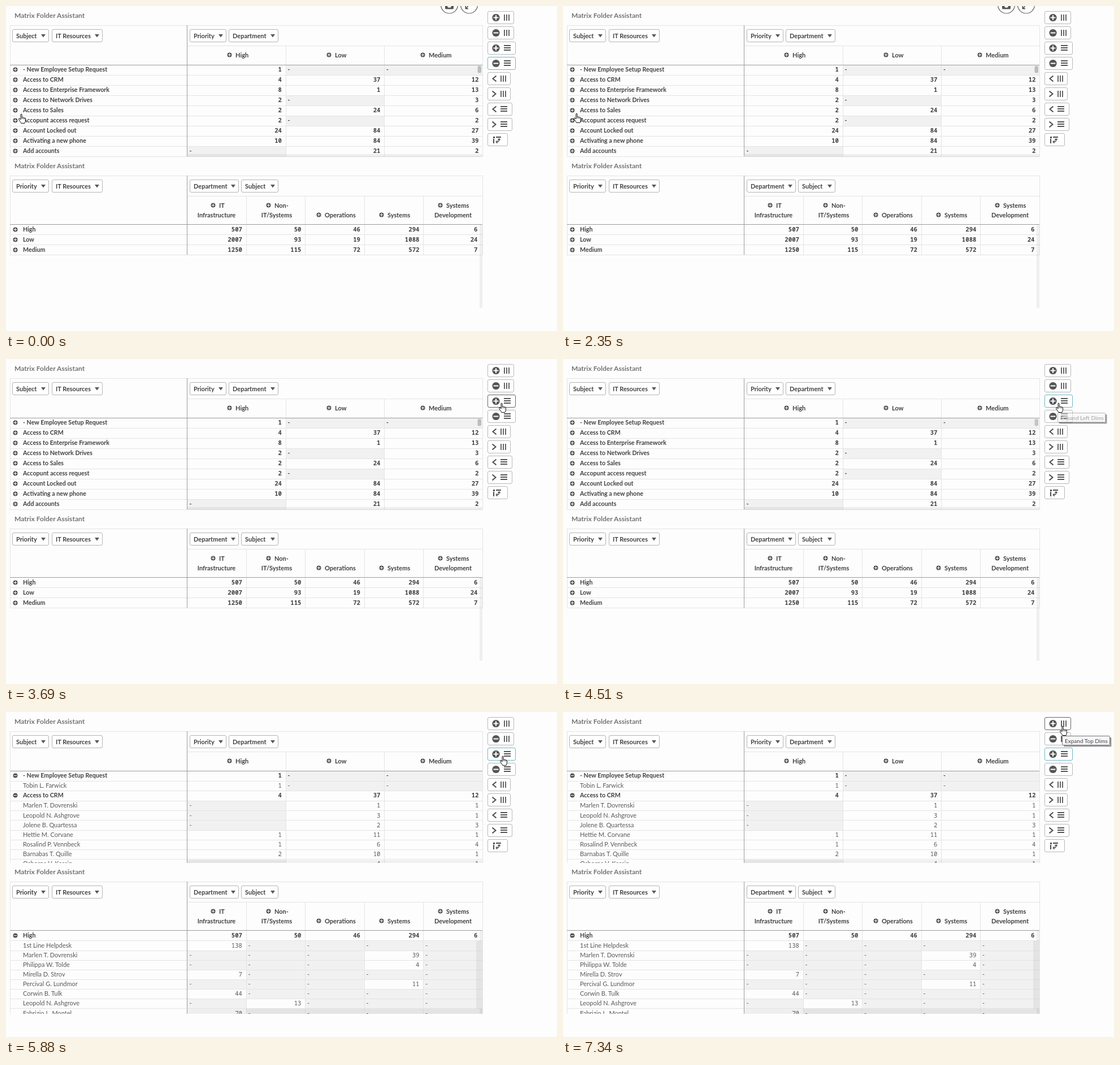
These frames come from a looping animation (975x575 px, 8000 ms). An HTML page:

```html
<!DOCTYPE html>
<html lang="en">
<head>
<meta charset="utf-8">
<title>Pivot tables</title>
<style>
html, body { margin: 0; width: 100%; height: 100%; overflow: hidden; background: #fdfdfd; }
svg { display: block; }
text { font: 11px Lato, "Open Sans", sans-serif; fill: #595959; white-space: pre; }
.b { font-weight: 700; fill: #404040; }
.parent { font-size: 10.7px; }
.title { font-size: 12.1px; font-weight: 700; fill: #747474; }
.num { font-family: "Noto Sans Mono", "DejaVu Sans Mono", monospace; font-size: 10.7px; text-anchor: end; }
.mid { text-anchor: middle; }
.tip text { font-size: 10px; fill: #484848; }
.btn { fill: #fff; stroke: #b8b8b8; }
</style>
</head>
<body>
<svg id="stage" width="975" height="575" viewBox="0 0 975 575"></svg>
<script>
const LIGHT = '#e4e4e4', DARK = '#9c9c9c', INK = '#4d4d4d', FOCUS = '#6fb6c6';

const rect = (x, y, w, h, fill, extra = '') =>
  `<rect x="${x}" y="${y}" width="${w}" height="${h}" fill="${fill}" ${extra}/>`;
const hline = (x1, x2, y, c = LIGHT) => rect(x1, Math.round(y), x2 - x1, 1, c);
const vline = (x, y1, y2, c = LIGHT) => rect(Math.floor(x), Math.round(y1), 1, Math.round(y2 - y1), c);
const path = (d, w) => `<path d="${d}" fill="none" stroke="${INK}" stroke-width="${w}"/>`;
// y is the middle of the text line
const label = (x, y, s, cls = '') => `<text x="${x}" y="${y + 4}" class="${cls}">${s}</text>`;

function knob(x, y, open, r = 4, w = 1) {
  const a = r * 0.66;
  const d = `M${x - a} ${y}h${2 * a}` + (open ? '' : `M${x} ${y - a}v${2 * a}`);
  return `<circle cx="${x}" cy="${y}" r="${r}" fill="#555"/><path d="${d}" stroke="#fff" stroke-width="${w}"/>`;
}

function dropdown(x, y, w, s) {
  const a = x + w - 10;
  return rect(x + .5, y - 11.5, w - 1, 22, '#fff', 'rx="2.5" stroke="#b5b5b5"') +
    label(x + 7, y, s, 'b') +
    `<path d="M${a - 4} ${y - 3}h8l-4 5.5z" fill="#595959"/>`;
}

// A row reads "+name|value|value"; the first sign is the knob, a blank marks a child.
function body(box, lines) {
  const { cols, top, bottom, lastPad } = box;
  let y = top, cells = '', grid = '', texts = '';
  for (const line of lines) {
    const [head, ...values] = line.split('|');
    const parent = head[0] !== ' ', h = parent ? 18 : 17.15;
    const mid = Math.round(y + 8.2), y0 = Math.round(y), y1 = Math.round(y + h);
    const weight = parent ? 'b parent' : '';
    if (parent) texts += knob(16.5, mid + .5, head[0] === '-');
    texts += label(30, mid, head.slice(1), weight);
    values.forEach((v, i) => {
      const x = cols[i], end = cols[i + 1];
      if (v) texts += label(end - (i === values.length - 1 ? lastPad : 7), mid, v, 'num ' + weight);
      else {
        cells += rect(x, y0, end - x, y1 - y0, '#f1f1f1');
        texts += label(x + 3.5, mid, '-', weight);
      }
    });
    grid += hline(7, 843, y1);
    y += h;
  }
  const end = Math.min(Math.round(y), bottom);
  cols.slice(1).forEach(x => grid += vline(x, top, end));
  return `<g clip-path="url(#${box.id})">${cells}${grid}${vline(7, top, end)}${vline(320, top, end, DARK)}${texts}</g>`;
}

function frame(box, head, sep) {
  const { cols, top } = box;
  let s = hline(7, 843, head) + hline(321, 843, sep) + vline(7, head, top) + vline(320, head, top, DARK);
  cols.slice(1).forEach((x, i) => s += vline(x, i === cols.length - 2 ? head : sep, top));
  return s + hline(7, 843, top, DARK);
}

const upper = { id: 'up', cols: [321, 495, 669.5, 843], top: 104, bottom: 267, lastPad: 6.5 };
const lower = { id: 'low', cols: [321, 425, 529.5, 634, 738.5, 843], top: 386.4, bottom: 534, lastPad: 8.5 };

const marlen = ' Marlen T. Dovrenski', philippa = ' Philippa W. Tolde', jolene = ' Jolene B. Quartessa',
  hettie = ' Hettie M. Corvane', leopold = ' Leopold N. Ashgrove', barnabas = ' Barnabas T. Quille';
const shared = [
  '+- New Employee Setup Request|1||', '+Access to CRM|4|37|12',
  '+Access to Enterprise Framework|8|1|13', '+Access to Network Drives|2||3'];

const upperClosed = [...shared, '+Access to Sales|2|24|6', '+Accopunt access request|2||2',
  '+Account Locked out|24|84|27', '+Activating a new phone|10|84|39', '+Add accounts||21|2'];
const upperOne = [...shared, '-Access to Sales|2|24|6', marlen + '|1|8|3', philippa + '||1|',
  jolene + '|1||3', hettie + '||9|', barnabas + '||6|'];
const upperAll = ['-- New Employee Setup Request|1||', ' Tobin L. Farwick|1||', '-Access to CRM|4|37|12',
  marlen + '||1|1', leopold + '||3|1', jolene + '||2|3', hettie + '|1|11|1',
  ' Rosalind P. Vennbeck|1|6|4', barnabas + '|2|10|1', ' Osborne V. Kessin||4|1'];
const lowerClosed = ['+High|507|50|46|294|6', '+Low|2007|93|19|1088|24', '+Medium|1250|115|72|572|7'];
const lowerAll = ['-High|507|50|46|294|6', ' 1st Line Helpdesk|138||||', marlen + '||||39|',
  philippa + '||||4|', ' Mirella D. Strov|7||||', ' Percival G. Lundmor||||11|',
  ' Corwin B. Tulk|44||||', leopold + '||13|||', ' Fabrizio L. Montel|70||||'];

// Three bars or lines, snapped to whole pixels
const bars = (x, y) => [-5, -1, 3].map(d => rect(x + d, y - 5.5, 2, 11, '#666')).join('');
const lines = (x, y) => [-5.5, -1.5, 2.5].map(d => rect(x - 6, y + d, 12, 2, '#555')).join('');

function toolbar() {
  const widths = [47, 47, 50, 50, 41, 41, 44, 44, 36];
  return widths.map((w, i) => {
    const y = 20.5 + 27 * i;
    let s = `<rect id="btn${i}" class="btn" x="852.5" y="${y - 11}" width="${w - 1}" height="22" rx="2.5"/>`;
    if (i < 4) s += knob(867, y, i % 2, 6.6, 2) + (i < 2 ? bars(886, y) : lines(887, y));
    else if (i < 8) {
      s += path(i % 2 ? `M860.5 ${y - 5}l6 5l-6 5` : `M867.5 ${y - 5}l-6 5l6 5`, 2);
      s += i < 6 ? bars(880, y) : lines(881, y);
    } else {
      s += rect(862, y - 5.5, 3, 3, INK) + rect(867, y - 5.5, 9, 2, INK) + rect(862, y - 1.5, 2, 8, INK) +
        path(`M872.5 ${y - 1}V${y + 1}Q872.5 ${y + 4} 867.5 ${y + 4}M870.3 ${y + .5}l2.2 -2.2l2.2 2.2M869.5 ${y + 1.8}l-2.2 2.2l2.2 2.2`, 1.4);
    }
    return s;
  }).join('');
}

// The shadow lies only along the right and lower edge; the last group fades.
const tip = (id, x, y, s) => `<g id="${id}" class="tip">` +
  rect(x + 85, y + 3, 2, 16, '#000', 'opacity=".4"') + rect(x + 3, y + 17, 82, 2, '#000', 'opacity=".4"') +
  rect(x + 87, y + 4, 1, 15, '#000', 'opacity=".15"') + rect(x + 4, y + 19, 83, 1, '#000', 'opacity=".15"') +
  `<g>${rect(x + .5, y + .5, 84, 16, '#f6f6f8', 'stroke="#767676" rx="1"')}${label(x + 5, y + 8.5, s)}</g></g>`;

const heads = [
  [395.5, 87, 'High'], [571.5, 87, 'Low'], [737.5, 87, 'Medium'],
  [366.5, 353, 'IT'], [464.5, 353, 'Non-'], [553.5, 370, 'Operations'], [664.5, 370, 'Systems'], [768.5, 353, 'Systems']
].map(([x, y, s]) => knob(x, y - .5, false) + label(x + 10.5, y, s, 'b')).join('') +
  [[372.5, 'Infrastructure'], [479, 'IT/Systems'], [791, 'Development']]
    .map(([x, s]) => label(x, 370, s, 'b mid')).join('');

const drops = [
  [11, 53, 65, 'Subject'], [81, 53, 90, 'IT Resources'], [325, 53, 65, 'Priority'], [394, 53, 88, 'Department'],
  [11, 319, 65, 'Priority'], [81, 319, 90, 'IT Resources'], [325, 319, 87, 'Department'], [416, 319, 66, 'Subject']
].map(d => dropdown(...d)).join('');

const corner = '<g id="corner">' +
  [784.5, 819.5].map(x => `<circle cx="${x}" cy="-2" r="15" fill="#fff" stroke="#6a6a6a" stroke-width="1.2"/>`).join('') +
  rect(777, -6, 15, 11.5, '#555', 'rx="1.5"') + '<circle cx="784.5" cy="-.5" r="3.5" fill="#fff"/>' +
  path('M817.5 .5l-3.7 3.7M813.3 0v4.6h4.6', 1.6) + '</g>';

const cursors = '<g id="hand" fill="#fff" stroke="#111" stroke-linejoin="round">' +
  '<path d="M4 1.8Q5 0 6.1 1.8V7Q7.5 6 8.3 7.4Q9.7 6.6 10.4 8Q12.5 7.6 12.5 10V13Q12.2 15 11 17.5H4.8Q4 15.5 2 13L.6 10.5Q.2 8.5 2 9L4 11Z"/>' +
  '<path d="M6.1 7v3M8.3 7.4v2.8M10.4 8v2.4" stroke-width=".8"/></g>' +
  '<path id="arrow" d="M.5 .5V14L3.6 11L5.8 16L7.8 15L5.6 10.3H9.8Z" fill="#fff" stroke="#111"/>';

const clip = b => `<clipPath id="${b.id}"><rect x="0" y="${b.top}" width="844" height="${b.bottom - b.top}"/></clipPath>`;
const group = (id, s) => `<g id="${id}">${s}</g>`;
const shade = (x, y, w, h) => rect(x, y, w, h, '#000', 'opacity=".055"');

document.getElementById('stage').innerHTML =
  `<defs>${clip(upper)}${clip(lower)}</defs>` +
  label(15, 17, 'Matrix Folder Assistant', 'title') + label(15, 283, 'Matrix Folder Assistant', 'title') +
  group('closed', body(upper, upperClosed)) + group('one', body(upper, upperOne)) +
  group('all', body(upper, upperAll) + body(lower, lowerAll) + shade(321, 525, 522, 9) + shade(832, 405, 6, 120)) +
  group('lowClosed', body(lower, lowerClosed)) +
  shade(321, 262, 522, 5) + shade(838, 387, 5, 147) +
  frame(upper, 34, 70) + frame(lower, 300, 336) + drops + heads +
  rect(834.5, 106, 6.5, 12.5, '#bdbdbd', 'id="thumb" rx="2.5"') +
  corner + toolbar() + tip('tipLeft', 875, 95, 'Expand Left Dims') + tip('tipTop', 883, 42, 'Expand Top Dims') + cursors;

// Each track is a list of [start ms, value...]
const tracks = {
  pointer: [[0, 'hand', 22, 190], [140, 'hand', 19, 189], [2660, 'arrow', 485, 104], [2810, 'arrow', 843, 78],
    [2960, 'arrow', 843, 76], [3420, 'hand', 887, 77], [3560, 'hand', 872, 77], [5880, 'hand', 874, 77],
    [6000, 'hand', 888, 70], [6120, 'arrow', 917, 55], [6250, 'arrow', 908, 36], [6370, 'hand', 896, 24],
    [6510, 'hand', 879, 24]],
  view: [[0, 'closed'], [670, 'one'], [2350, 'closed'], [4630, 'all']],
  btn0: [[0, '#b8b8b8'], [6510, '#8f8f8f'], [6660, '#666']],
  btn2: [[0, '#b8b8b8'], [3560, '#8f8f8f'], [3690, '#666'], [4360, FOCUS]],
  btn3: [[0, FOCUS], [530, '#98b8bf'], [670, '#b8b8b8']],
  thumb: [[0, '#bdbdbd'], [3840, '#c2c2c2'], [3960, '#c6c6c6'], [4630, 'none']],
  tipLeft: [[0, 0], [4210, .6], [4360, .85], [4510, .5], [4630, 0]],
  tipTop: [[0, 0], [7190, .6], [7340, 1]]
};
const at = (name, t) => tracks[name].findLast(k => k[0] <= t).slice(1);
const el = id => document.getElementById(id);
const show = (id, on) => { el(id).style.display = on ? '' : 'none'; };

function draw(now) {
  const t = now % 8000;
  const [kind, x, y] = at('pointer', t), [view] = at('view', t);
  for (const id of ['hand', 'arrow']) show(id, id === kind);
  el(kind).setAttribute('transform', `translate(${x} ${y})`);
  for (const id of ['closed', 'one', 'all']) show(id, id === view);
  show('lowClosed', view !== 'all');
  show('corner', t < 3420);
  for (const id of ['btn0', 'btn2', 'btn3']) el(id).style.stroke = at(id, t)[0];
  el('thumb').style.fill = at('thumb', t)[0];
  for (const id of ['tipLeft', 'tipTop']) {
    const [o] = at(id, t);
    show(id, o > 0);
    el(id).lastChild.style.opacity = o;
  }
}

const start = performance.now();
(function tick() {
  draw(performance.now() - start);
  requestAnimationFrame(tick);
})();
</script>
</body>
</html>
```
